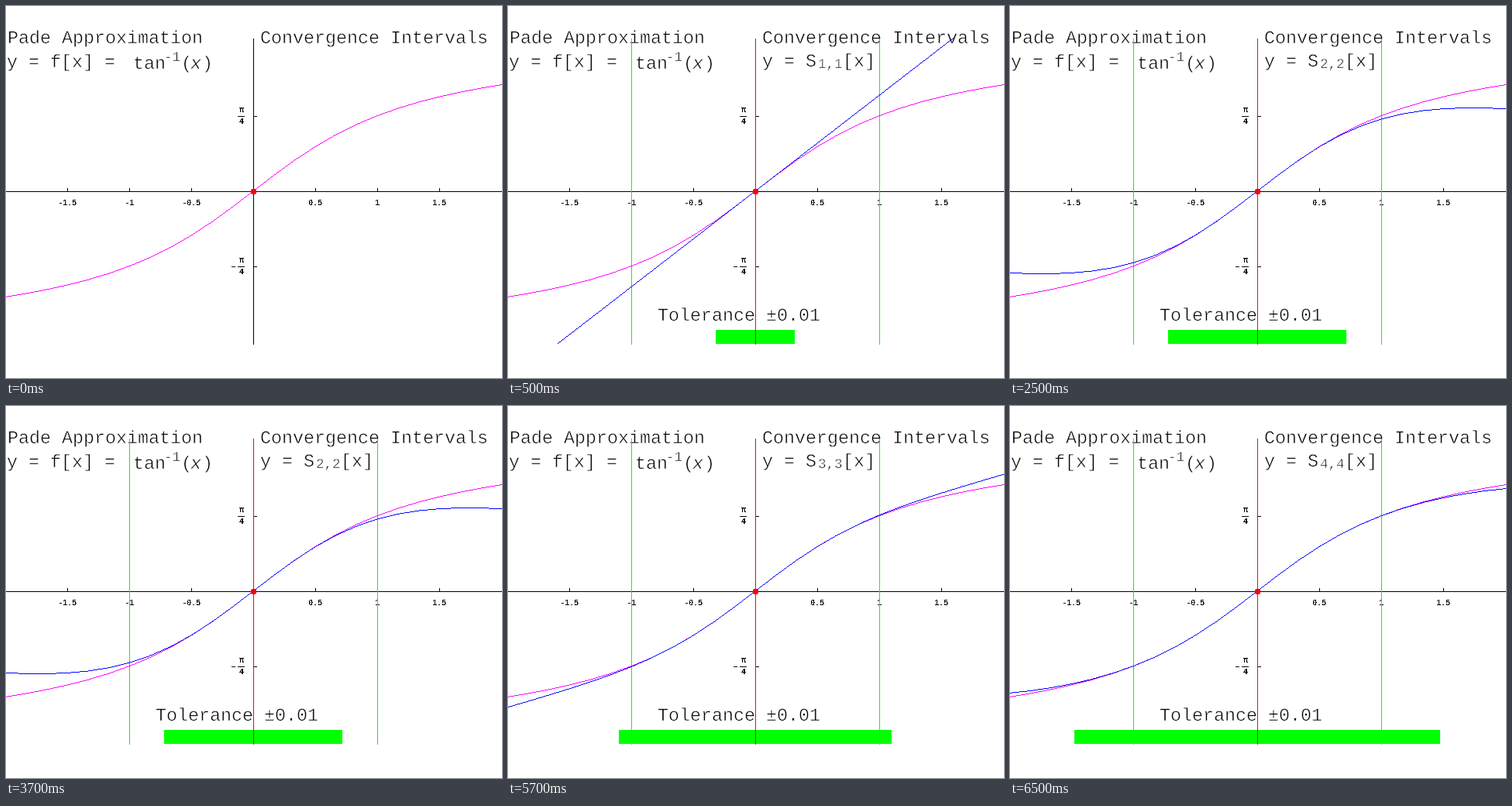
Animation of 640 by 480 pixels, one loop 8 s. Source, as a matplotlib script:

```python
import numpy as np
import matplotlib.pyplot as plt
from matplotlib.animation import FuncAnimation
from matplotlib.patches import Circle, Rectangle
from matplotlib.patheffects import Stroke

plt.rcParams["font.family"] = "Liberation Mono"
plt.rcParams["axes.unicode_minus"] = False

WIDTH, HEIGHT, DPI = 640, 480, 100
PX = 72 / DPI                      # points per pixel
X0, Y0 = 319, 239                  # pixel at the origin of the plot
XS, YS = 160, 123.6                # pixels per unit
TOP, BOTTOM = 42, 436
TITLE, SCRIPT, TICK = 23.33, 17.5, 10
TOLERANCE = 0.01
THIN = [Stroke(linewidth=0.6 * PX, foreground="white")]

PADE = {
    1: lambda x: x,
    2: lambda x: 3 * x / (3 + x**2),
    3: lambda x: (x + 4 / 15 * x**3) / (1 + 3 / 5 * x**2),
    4: lambda x: (x + 11 / 21 * x**3) / (1 + 6 / 7 * x**2 + 3 / 35 * x**4),
}

fig = plt.figure(figsize=(WIDTH / DPI, HEIGHT / DPI), dpi=DPI, facecolor="white")
ax = fig.add_axes([0, 0, 1, 1])
ax.set_xlim(0, WIDTH)
ax.set_ylim(HEIGHT, 0)
ax.axis("off")


def label(x, y, text, size=TITLE, **style):
    """Large text in thin strokes."""
    return ax.text(x, y, text, fontsize=size * PX, zorder=2, path_effects=THIN,
                   va="baseline", **style)


def tick_label(x, y, text):
    ax.text(x, y, text, fontsize=TICK * PX, weight="bold", ha="center",
            va="baseline", zorder=2, antialiased=False)


def segment(x, y, color="black", zorder=5):
    return ax.plot(x, y, color=color, lw=PX, antialiased=False,
                   solid_capstyle="butt", zorder=zorder)[0]


def curve(color, zorder):
    """A hairline drawn as one pixel per column."""
    return ax.plot([], [], ",", color=color, antialiased=False, zorder=zorder)[0]


def plot(line, func):
    knots = np.linspace(-2, 2, 25)
    columns = np.arange(WIDTH)
    rows = np.rint(Y0 - YS * np.interp((columns - X0) / XS, knots, func(knots)))
    inside = (rows >= TOP) & (rows <= BOTTOM)
    line.set_data(columns[inside], rows[inside])


def radius(func):
    """Distance from zero at which the error first passes the tolerance."""
    x = np.linspace(0, 2, 20001)
    return x[np.argmax(np.abs(func(x) - np.arctan(x)) > TOLERANCE)]


def draw_axes():
    segment([0, WIDTH], [Y0, Y0])
    segment([X0, X0], [TOP, BOTTOM])
    for value in (-1.5, -1, -0.5, 0.5, 1, 1.5):
        x = X0 + XS * value
        segment([x, x], [Y0 - 4, Y0])
        tick_label(x, 257, f"{value:g}")
    for sign in (-1, 1):
        y = round(Y0 - sign * YS * np.pi / 4)
        segment([X0, X0 + 4], [y, y])
        segment([299, 307], [y, y])
        tick_label(303.5, y - 5, "π")
        tick_label(303.5, y + 10, "4")
        if sign < 0:
            segment([291, 295], [y, y])


def draw_titles():
    label(2, 48, "Pade Approximation")
    label(1, 79, "y = f[x] =")
    label(164, 81, "tan")
    label(204, 71, "-1", SCRIPT)
    label(226, 81, "(")
    label(238, 81, "x", style="italic")
    label(253, 81, ")")
    label(328, 48, "Convergence Intervals")


draw_axes()
draw_titles()
arctan = curve("#ff00ff", 6)
plot(arctan, np.arctan)
ax.add_patch(Circle((X0 + 0.5, Y0 + 0.5), 3.2, color="red", lw=0,
                    antialiased=False, zorder=9))

approx = curve("#0000ff", 7)
index = label(400, 80, "", SCRIPT)
bar = ax.add_patch(Rectangle((0, 418), 0, 18, color="#00ff00", lw=0,
                             antialiased=False, zorder=4))
extras = [approx, index, bar,
          label(328, 78, "y = S"), label(432, 78, "[x]"),
          label(193, 406, "Tolerance ±0.01")]
for value, color in ((-1, "#00ff00"), (0, "#ff0000"), (1, "#00ff00")):
    extras.append(segment([X0 + value * XS] * 2, [TOP, BOTTOM], color))


def update(step):
    order = (step + 3) // 4        # the plain curve, then four steps per order
    for artist in extras:
        artist.set_visible(order > 0)
    if order:
        func = PADE[order]
        plot(approx, func)
        index.set_text(f"{order},{order}")
        half = XS * radius(func)
        bar.set_x(X0 - half)
        bar.set_width(2 * half)
    return extras


anim = FuncAnimation(fig, update, frames=16, interval=500, repeat=True,
                     repeat_delay=0, blit=False)
plt.show()
```
